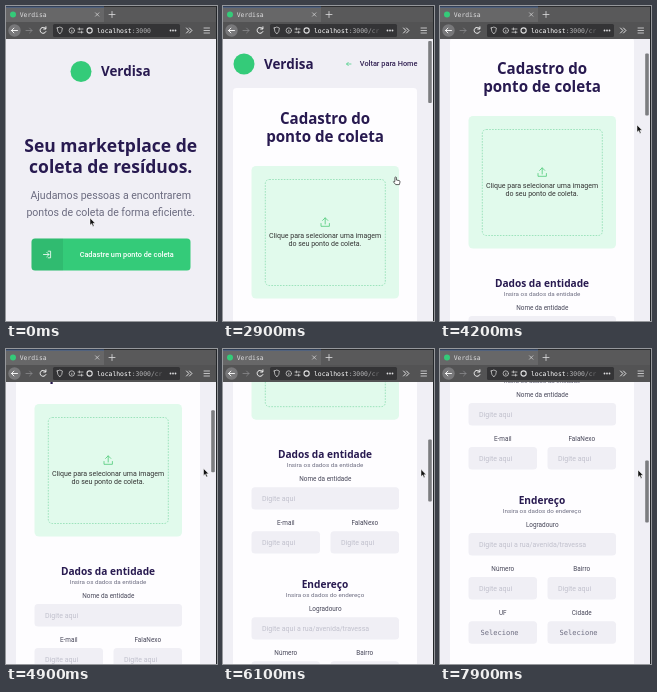
An HTML page that plays this animation: 211 px wide and 315 px high, repeating every 8000 ms.

```html
<!DOCTYPE html>
<html lang="pt">
<head>
<meta charset="utf-8">
<title>Verdisa</title>
<style>
  html, body { margin: 0; width: 100%; height: 100%; overflow: hidden; background: #232629; }
  svg { display: block; width: 211px; height: 315px; }
  text { font-family: Roboto, sans-serif; }
  .title { font-family: "Noto Sans", sans-serif; font-weight: 700; fill: #281a50; }
  .mono { font-family: "DejaVu Sans Mono", monospace; }
  .line { fill: none; stroke-linecap: round; stroke-linejoin: round; }
</style>
</head>
<body>
<svg viewBox="0 0 211 315">
  <defs>
    <clipPath id="view"><rect y="33" width="210" height="282"/></clipPath>
    <linearGradient id="fade">
      <stop offset="0" stop-color="#343436" stop-opacity="0"/>
      <stop offset="1" stop-color="#343436"/>
    </linearGradient>
  </defs>
  <g clip-path="url(#view)">
    <rect y="33" width="210" height="282" fill="#f0eff5"/>
    <g id="home"></g>
    <g id="form"></g>
    <rect id="thumb" x="205.2" width="3.6" height="62" rx="1" fill="#7c7d80"/>
  </g>
  <g id="chrome"></g>
  <path id="arrow" d="M0 0V7.2L1.7 5.7L2.9 8.5L4.1 8L2.9 5.3H5.2Z" fill="#111" stroke="#fff" stroke-width=".5"/>
  <path id="hand" d="M-1.6 -2.6Q-.8 -3.4 -.1 -2.6V0L2.8 .6Q3.7 .9 3.5 2L2.9 4.6H-.8L-3.1 1.8Q-2.9 .9 -1.6 1.5Z" fill="#fff" stroke="#222" stroke-width=".7"/>
</svg>
<script>
const $ = id => document.getElementById(id);
const BRAND = 'Verdisa', GREEN = '#34cb79', GREY = '#6c6c80', INK = '#48485a';

const rect = (x, y, w, h, fill, rx = 0, more = '') =>
  `<rect x="${x}" y="${y}" width="${w}" height="${h}" rx="${rx}" fill="${fill}" ${more}/>`;
const line = (d, color, width = .8, more = '') =>
  `<path class="line" d="${d}" stroke="${color}" stroke-width="${width}" ${more}/>`;
const dot = (x, y, r, fill) => `<circle cx="${x}" cy="${y}" r="${r}" fill="${fill}"/>`;
const text = (s, x, y, size, fill = INK, more = '') =>
  `<text x="${x}" y="${y}" font-size="${size}" fill="${fill}" ${more}>${s}</text>`;
const mid = (s, x, y, size, fill, more = '') =>
  text(s, x, y, size, fill, 'text-anchor="middle" ' + more);
const title = (s, x, y, size) => mid(s, x, y, size, '', 'class="title"');
const logo = (x, y) => dot(x, y, 10.5, GREEN) +
  text(BRAND, x + 20, y + 4.8, 13.4, '', 'class="title"');

$('home').innerHTML =
  logo(75, 65.5) +
  title('Seu marketplace de', 104.7, 146.3, 17.5) +
  title('coleta de resíduos.', 104.7, 167.3, 17.5) +
  mid('Ajudamos pessoas a encontrarem', 104.7, 193, 10.55, GREY) +
  mid('pontos de coleta de forma eficiente.', 104.7, 210, 10.55, GREY) +
  rect(25.5, 232.5, 159, 32, GREEN, 3.5, 'id="button"') +
  '<path d="M57 232.5H29Q25.5 232.5 25.5 236V261Q25.5 264.5 29 264.5H57Z" opacity=".08"/>' +
  line('M37.5 248.5h5.5m-2.2 -2.2l2.2 2.2l-2.2 2.2M42.2 245.2h2.4v6.6h-2.4', '#fff') +
  mid('Cadastre um ponto de coleta', 120.7, 251, 7.3, '#fff', 'font-weight="500"');

// One labelled field; a select shows its prompt in monospace.
function field(label, x, y, w, hint = 'Digite aqui', select = false) {
  return mid(label, x + w / 2, y - 6, 6.4) +
    rect(x, y, w, 22.4, '#f0eff5', 3.5) +
    (select ? text(hint, x + 12, y + 13.8, 7.04, GREY, 'class="mono"')
            : text(hint, x + 10.5, y + 13.6, 7.04, '#c1c1cd'));
}
const pair = (a, b, y, ...rest) => field(a, 28.5, y, 68.5, ...rest) + field(b, 107.5, y, 68.5, ...rest);
const section = (name, note, y) => title(name, 102, y, 10.15) + mid(note, 102, y + 9.2, 6.25, GREY);

$('form').innerHTML =
  logo(21, 58) +
  line('M128 58h-4.4m1.7 -1.7l-1.7 1.7l1.7 1.7', GREEN, .7) +
  text('Voltar para Home', 136.8, 60.3, 7.35, '#322153', 'font-weight="500"') +
  rect(10, 82, 184, 1200, '#fefdff', 3.5) +
  title('Cadastro do', 102, 117.6, 15.1) +
  title('ponto de coleta', 102, 136.2, 15.15) +
  rect(28.5, 160, 147.5, 132.5, '#e1faec', 4.5) +
  rect(42.3, 173.5, 120, 106, 'none', 4, 'stroke="#6fd49c" stroke-width=".6" stroke-dasharray="1.6 1.3"') +
  line('M102.2 218v-6m-2.6 2.4l2.6 -2.6l2.6 2.6M98 217.5v2.8h8.4v-2.8', '#4ecb79') +
  mid('Clique para selecionar uma imagem', 102, 231.5, 7.04, '#333') +
  mid('do seu ponto de coleta.', 102, 239.8, 7.04, '#333') +
  section('Dados da entidade', 'Insira os dados da entidade', 330.5) +
  field('Nome da entidade', 28.5, 360, 147.5) +
  pair('E-mail', 'FalaNexo', 404) +
  section('Endereço', 'Insira os dados do endereço', 460.5) +
  field('Logradouro', 28.5, 490, 147.5, 'Digite aqui a rua/avenida/travessa') +
  pair('Número', 'Bairro', 534) +
  pair('UF', 'Cidade', 578.3, 'Selecione', true);

const LIGHT = '#dededf';
$('chrome').innerHTML =
  rect(0, 0, 210, 17, '#59595a') + rect(0, 0, 98, 17, '#676768') +
  rect(0, 0, 210, 1, '#2b2c2e') + rect(0, .6, 98, .9, '#3d5f93') +
  rect(0, 16, 210, 17, '#535354') +
  dot(7, 8.5, 3, GREEN) +
  text(BRAND, 13.7, 10.8, 6.4, LIGHT, 'class="mono"') +
  line('M89.5 6.8l3.4 3.4m0 -3.4l-3.4 3.4', LIGHT, .7) +
  line('M106 5.5v6m-3 -3h6', LIGHT) +
  dot(8.5, 24.5, 6.2, '#78787a') +
  line('M11.5 24.5h-6m2.4 -2.4l-2.4 2.4l2.4 2.4', '#fff', .9) +
  line('M20 24.5h6m-2.4 -2.4l2.4 2.4l-2.4 2.4', '#8a8a8c') +
  line('M39.6 22.6a3 3 0 1 0 .3 3M39.9 20.8v2.2h-2.2', '#f2f2f2', 1) +
  rect(47, 18, 127, 13, '#343436', 1.5) +
  line('M51.2 22l2.6 -1l2.6 1q0 4 -2.6 6q-2.6 -2 -2.6 -6Z', LIGHT, .7) +
  line('M68.5 24.5a2.7 2.7 0 1 0 -5.4 0a2.7 2.7 0 1 0 5.4 0M65.8 24.2v1.5', LIGHT, .7) +
  line('M72 23h5m-5 3.2h5m-3.6 -4.3v2m2.2 1.2v2', LIGHT, .7) +
  line('M86.2 24.5a2.6 2.6 0 1 0 -5.2 0a2.6 2.6 0 1 0 5.2 0', LIGHT, 1.1) +
  text('localhost<tspan fill="#b4b4b6">:3000</tspan><tspan id="path" fill="#b4b4b6">/cr</tspan>',
    91, 27, 6.4, '#fff', 'class="mono"') +
  rect(145, 19, 16, 11, 'url(#fade)') +
  [164.5, 167, 169.5].map(x => dot(x, 24.5, .9, LIGHT)).join('') +
  line('M180.5 22l2.4 2.5l-2.4 2.5m3 -5l2.4 2.5l-2.4 2.5', '#f2f2f2', .9) +
  line('M198 22h5.5m-5.5 2.5h5.5m-5.5 2.5h5.5', LIGHT);

// Tracks: time in ms followed by values.
const POINTER = [
  [0, 84, 212], [200, 96, 242], [400, 150, 260], [550, 198, 225], [720, 190, 64], [900, 150, 94],
  [1100, 196, 110], [1350, 200, 170], [1600, 130, 214], [1800, 92, 217], [1900, 81, 223],
  [2200, 104, 244], [2500, 130, 246], [2700, 156, 215], [2900, 173.5, 174], [3100, 199, 58],
  [3300, 197, 119], [4200, 197, 119], [5600, 198, 120], [7000, 198, 121], [8000, 198, 121]
];
const SCROLL = [
  [0, 0], [3500, 0], [4200, 50], [4400, 62], [4500, 62], [5300, 148], [5500, 148], [5600, 151],
  [6200, 236], [6500, 236], [7000, 271], [7400, 302], [7700, 302], [7900, 306], [8000, 306]
];
const NAVIGATE = 2500;

function at(track, t) {
  const i = track.findIndex(k => k[0] > t);
  const a = track[i - 1], b = track[i], p = (t - a[0]) / (b[0] - a[0]);
  return a.slice(1).map((v, j) => v + (b[j + 1] - v) * p);
}
const show = (id, on) => $(id).style.display = on ? '' : 'none';

function draw(now) {
  const t = Math.floor(now % 8000 / 100) * 100;
  const [x, y] = at(POINTER, t), [scroll] = at(SCROLL, t);
  const form = t >= NAVIGATE;
  const overButton = !form && x > 25 && x < 185 && y > 232 && y < 265;
  const overDrop = form && x > 28 && x < 176 && y > 160 && y < 293;
  const pointing = overButton || overDrop;

  show('home', !form);
  for (const id of ['form', 'path', 'thumb']) show(id, form);
  show('arrow', !pointing);
  show('hand', pointing);
  $('button').setAttribute('fill', overButton ? '#2fb86e' : GREEN);
  $('form').setAttribute('transform', `translate(0 ${-scroll})`);
  $('thumb').setAttribute('y', 35 + scroll / 4);
  $(pointing ? 'hand' : 'arrow').setAttribute('transform', `translate(${x} ${y})`);
  requestAnimationFrame(draw);
}
draw(0);
</script>
</body>
</html>
```
